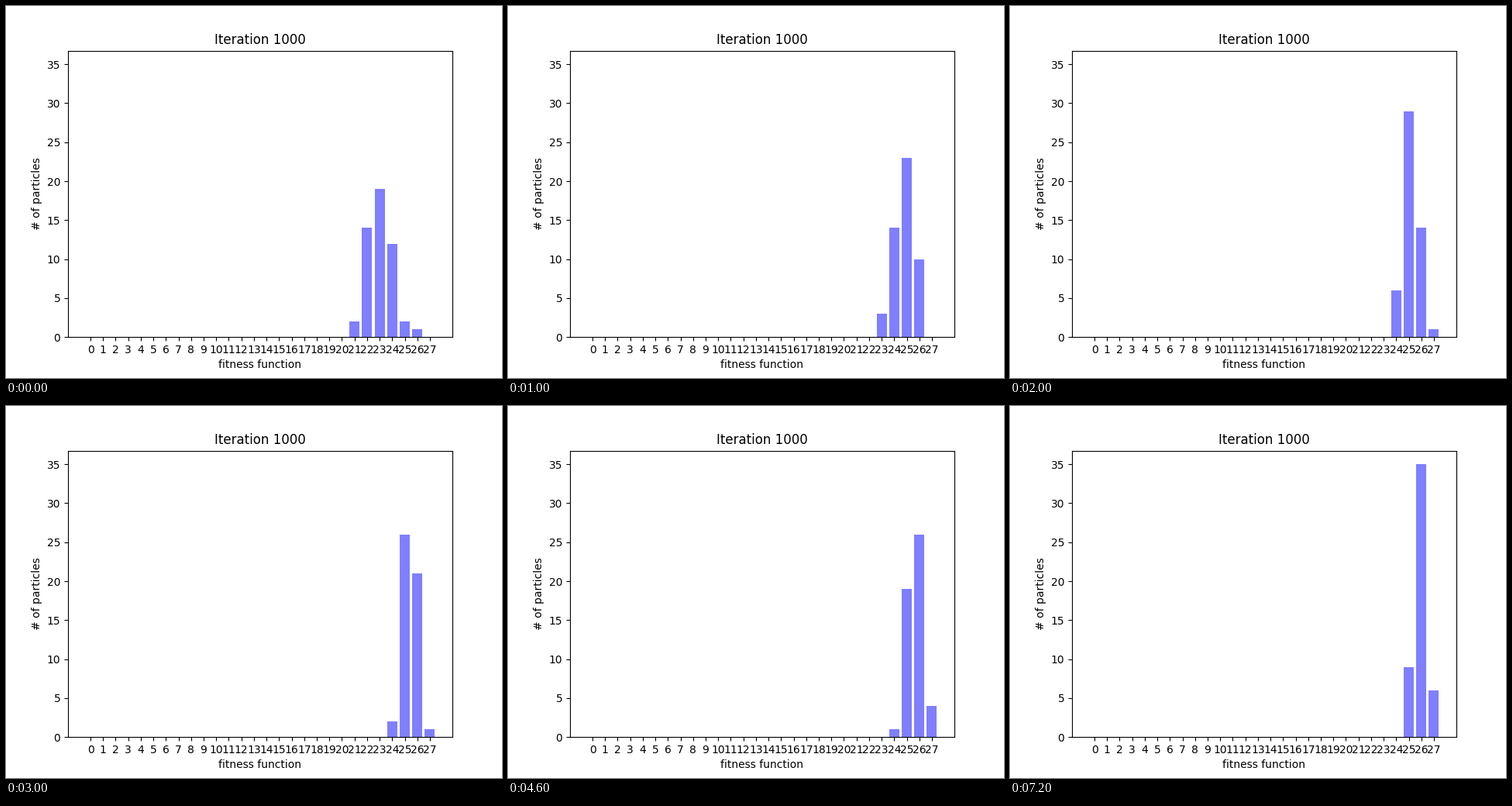
Animation, 640 px wide and 480 px high, one loop 8000 ms. Source, as a matplotlib script:

```python
import matplotlib.pyplot as plt
import numpy as np
from matplotlib.animation import FuncAnimation

STEP_MS = 200
STEPS = 40
BINS = 28

# Key points: step -> particle counts in the highest bins
KEYS = {
    0: (2, 14, 19, 12, 2, 1, 0),
    5: (3, 14, 23, 10, 0),
    10: (6, 29, 14, 1),
    15: (2, 26, 21, 1),
    19: (1, 21, 27, 1),
    23: (1, 19, 26, 4),
    29: (1, 13, 31, 5),
    36: (9, 35, 6),
}
# Steps on which no particle improves
IDLE = {11, 18, 20, 22, 24, 25, 27, 30, 31}


def progress(step):
    """Number of steps so far on which the swarm has moved."""
    return sum(s not in IDLE for s in range(1, step + 1))


def at_least(counts):
    """Particles at or above each fitness value, best value first."""
    padded = (0,) * (BINS - len(counts)) + counts
    return np.cumsum(padded[::-1])


key_times = [progress(step) for step in KEYS]
key_totals = np.array([at_least(counts) for counts in KEYS.values()])


def counts_at(step):
    """Interpolated counts; rounding running totals keeps their sum fixed."""
    now = progress(step)
    totals = [np.interp(now, key_times, column) for column in key_totals.T]
    return np.diff(np.round(totals), prepend=0)[::-1]


fig, ax = plt.subplots(figsize=(6.4, 4.8), dpi=100)
bins = np.arange(BINS)
bars = ax.bar(bins, counts_at(0), width=0.8, color="blue", alpha=0.5)
margin = 0.05 * (BINS - 0.2)
ax.set_xlim(-0.4 - margin, BINS - 0.6 + margin)
ax.set_ylim(0, 35 * 1.05)
ax.set_xticks(bins)
ax.set_yticks(range(0, 36, 5))
ax.set_xlabel("fitness function")
ax.set_ylabel("# of particles")
ax.set_title("Iteration 1000")


def draw(step):
    for bar, count in zip(bars, counts_at(step)):
        bar.set_height(count)
    return list(bars)


anim = FuncAnimation(fig, draw, frames=STEPS, interval=STEP_MS,
                     repeat=True, repeat_delay=0, blit=False)
plt.show()
```
